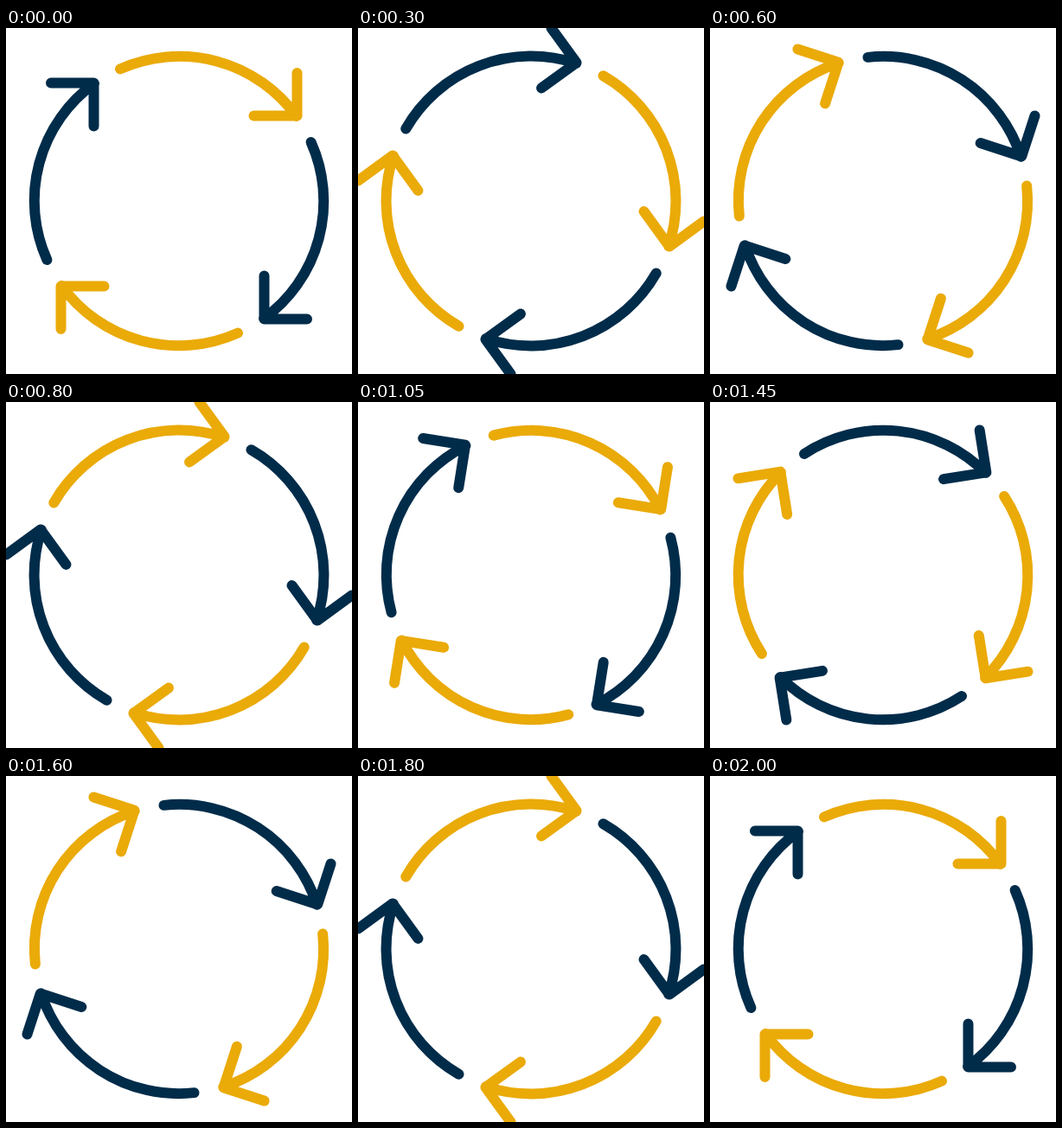
An HTML page for the animation above (2020 ms loop, 400x400 px).

```html
<!DOCTYPE html>
<html>
<head>
<meta charset="utf-8">
<title>Turning arrows</title>
<style>
  html, body { margin: 0; width: 100%; height: 100%; overflow: hidden; background: #fff; }
  svg { display: block; width: 100vw; height: 100vh; }
</style>
</head>
<body>
<svg viewBox="-200 -200 400 400" fill="none" stroke-width="12" stroke-linecap="round" stroke-linejoin="round">
  <defs>
    <path id="arrow" d="M-68 -152.6A167 167 0 0 1 135.8 -98M86.5 -98.5H136.5V-148"/>
  </defs>
  <g id="ring">
    <use href="#arrow" stroke="#eaaa08"/>
    <use href="#arrow" stroke="#002c4a" transform="rotate(90)"/>
    <use href="#arrow" stroke="#eaaa08" transform="rotate(180)"/>
    <use href="#arrow" stroke="#002c4a" transform="rotate(270)"/>
  </g>
</svg>
<script>
  const LOOP = 2020, STEP = 25, STEP_ANGLE = 4.5;
  const ring = document.getElementById('ring');
  const start = performance.now();

  function draw(now) {
    const t = Math.max(0, now - start) % LOOP;
    // Steps of 25 ms, each starting on a whole 10 ms tick
    const tick = Math.floor(t / 10) * 10;
    const step = Math.floor((tick + 5) / STEP);
    ring.setAttribute('transform', `rotate(${step * STEP_ANGLE})`);
    requestAnimationFrame(draw);
  }
  draw(start);
</script>
</body>
</html>
```
